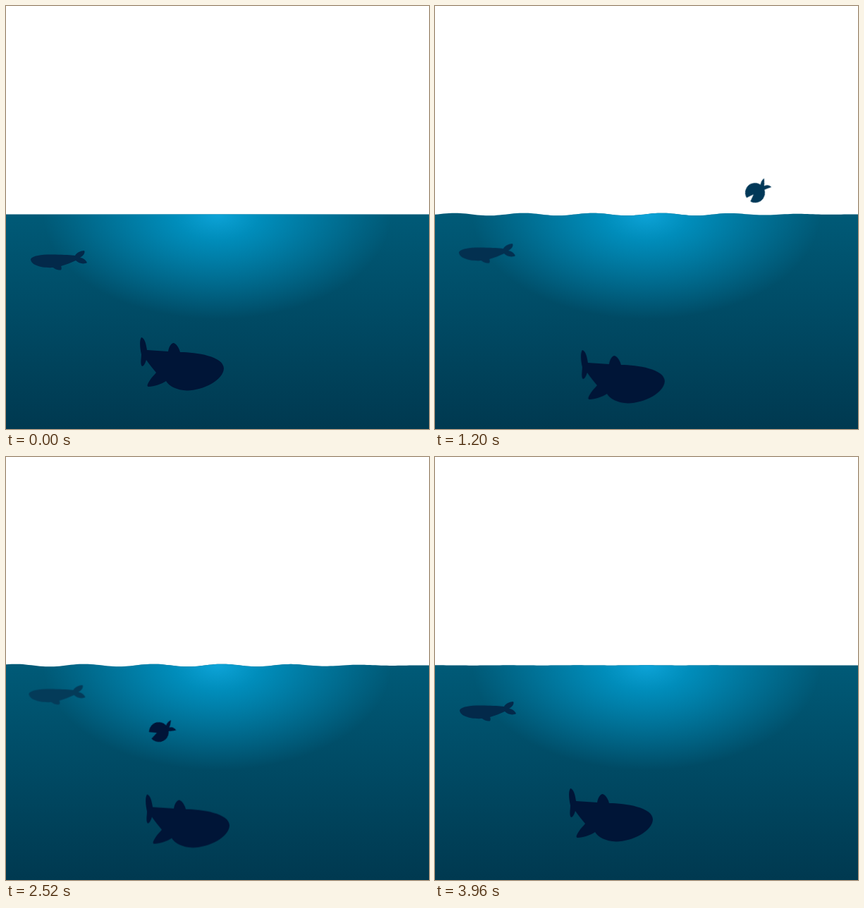
Recreate the animation shown at these times as an HTML page. Size 600 px wide and 600 px high, loop 4000 ms.

```html
<!DOCTYPE html>
<html lang="en">
<head>
<meta charset="utf-8">
<title>Sea</title>
<style>
  html, body { margin: 0; width: 100%; height: 100%; overflow: hidden; background: #fff; }
  svg { display: block; width: 100%; height: 100%; }
  #shark, #whale { animation: 4s cubic-bezier(.333, 0, .667, 1) infinite; }
  #shark { fill: #001537; animation-name: dive; }
  #whale { animation-name: rise; }
  @keyframes dive {
    0%, 100% { transform: translate(0, 0); }
    22.5% { transform: translate(17.3px, 18.5px); }
  }
  @keyframes rise {
    0%, 100% { transform: translate(0, 0); fill: #03294a; }
    68% { transform: translate(-2.6px, -23.8px); fill: #043b59; }
  }
</style>
</head>
<body>
<svg viewBox="0 0 600 600">
  <defs>
    <linearGradient id="deep" gradientUnits="userSpaceOnUse" x1="0" y1="295" x2="0" y2="600">
      <stop offset="0" stop-color="#005a77"/>
      <stop offset="1" stop-color="#003950"/>
    </linearGradient>
    <radialGradient id="glow" gradientUnits="userSpaceOnUse" cx="0" cy="0" r="1"
      gradientTransform="translate(300 295) scale(247 149)">
      <stop offset="0" stop-color="#0ea4d8"/>
      <stop offset=".25" stop-color="#009acc" stop-opacity=".8"/>
      <stop offset="1" stop-color="#0098ca" stop-opacity="0"/>
    </radialGradient>
  </defs>

  <path class="water" fill="url(#deep)"/>
  <path class="water" fill="url(#glow)"/>

  <path id="whale" d="M35 359C38 353 55 352 70 352.5C82 353 92 353 98 354C100 350 106 347 111 347
    C113 350 109 355 105 357C109 357 113 360 115 364C110 367 103 365 99 361C92 364 85 367 78 369
    C79 371 79 373 78 374.5C74 375 69 373 67 371C52 372 35 368 35 359Z"/>

  <path id="shark" d="M192 470C197 471 199 481 200 488L230 490C231 484 234 478 238 478
    C243 480 246 487 247 491C270 491 309 497 309 514C308 531 280 545 257 545.5
    C242 545 231 539 227 532C221 536 210 540 202 540C199 539 201 536 204 531
    C207 526 211 523 213 520C208 514 203 508 199 502C197 508 195 511 193 511
    C190 508 192 500 192 494C190 486 189 474 192 470Z"/>

  <g id="drops" fill="#5c8da5"></g>

  <g id="fish">
    <path id="body"/>
    <path id="tail" d="M11 -2C13 -6 16 -10 22 -10C20 -7 19 -4 16 -1C20 -1 23 2 24 6C19 5 15 4 11 3Z"/>
  </g>
</svg>
<script>
  const LOOP = 4000, SURFACE = 295.5, WAVELENGTH = 98;
  const APEX = 825, DIVE = 1200, SPLASH = 560;
  const $ = id => document.getElementById(id);
  const waters = document.querySelectorAll('.water');
  const clamp = (v, lo = 0, hi = 1) => Math.min(hi, Math.max(lo, v));
  const smooth = u => clamp(u) ** 2 * (3 - 2 * clamp(u));
  const bump = (t, center, width) => Math.exp(-(((t - center) / width) ** 2));

  const drops = [[589, 249, 2.7], [597, 265, 1.9], [559, 258, 1]].map(([x, y, r]) => {
    const el = document.createElementNS('http://www.w3.org/2000/svg', 'circle');
    el.setAttribute('r', r);
    $('drops').append(el);
    return { el, x, y };
  });

  function drawWater(t) {
    // The swell starts and ends flat and calms down once in the middle.
    const swell = 1.9 * Math.min(1, 2.5 * Math.sin(Math.PI * t / LOOP)) * (1 - .5 * bump(t, 1850, 400));
    const crest = 50 + .063 * t;
    let d = 'M0 600';
    for (let x = 0; x <= 600; x += 4) {
      const amp = swell * clamp((600 - x) / 220);
      const y = SURFACE - amp * Math.cos((x - crest) * 2 * Math.PI / WAVELENGTH);
      d += `L${x} ${y.toFixed(2)}`;
    }
    for (const water of waters) water.setAttribute('d', d + 'V600Z');
  }

  // A ballistic leap, then a glide slowed by the water.
  function fishPose(t) {
    const dt = t - DIVE;
    return dt < 0
      ? { x: 454 - .166 * dt, y: 203 + ((t - APEX) / 47.6) ** 2, tilt: -46 - .067 * dt }
      : { x: 454 - .1797 * dt, y: 265 + .03 * dt + 87 * (1 - Math.exp(-.0031 * dt)),
          tilt: -21 - 25 * Math.exp(-dt / 150) };
  }

  function drawFish(t) {
    const { x, y, tilt } = fishPose(t);
    const wag = 1 + 14 * bump(t, 1440, 550);
    const gape = (6 + 15 * smooth((t - SPLASH) / 1120)) * Math.PI / 180;
    const lipX = -14 * Math.cos(gape), lipY = 14 * Math.sin(gape);
    const dark = clamp((t - DIVE) / 500);
    const fish = $('fish');
    fish.style.display = t < 220 ? 'none' : '';
    fish.setAttribute('transform', `translate(${x} ${y}) rotate(${tilt})`);
    fish.setAttribute('fill', `rgb(1,${56 - 35 * dark},${88 - 32 * dark})`);
    $('body').setAttribute('d', `M-3 0L${lipX} ${-lipY}A14 14 0 1 1 ${lipX} ${lipY}Z`);
    $('tail').setAttribute('transform', `rotate(${wag})`);
  }

  function drawDrops(t) {
    const dt = t - SPLASH;
    for (const { el, x, y } of drops) {
      const cy = y - .06 * dt + .00044 * dt * dt;
      el.setAttribute('cx', x - .05 * dt);
      el.setAttribute('cy', cy);
      el.style.display = t > 420 && cy < SURFACE ? '' : 'none';
    }
  }

  let start;
  function frame(now) {
    start ??= now;
    const t = (now - start) % LOOP;
    drawWater(t);
    drawFish(t);
    drawDrops(t);
    requestAnimationFrame(frame);
  }
  requestAnimationFrame(frame);
</script>
</body>
</html>
```
